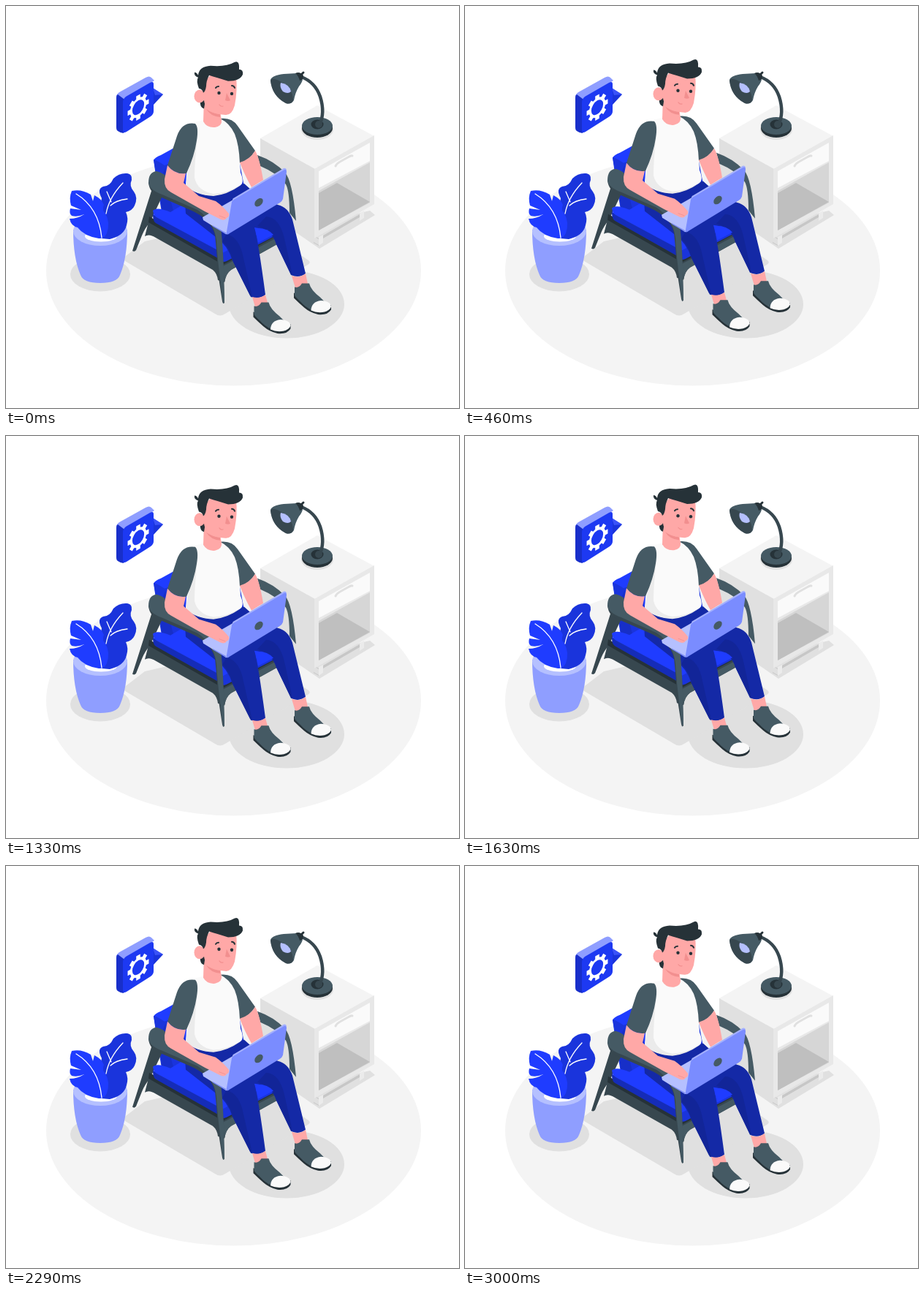
Animation of 620 by 550 pixels, one loop 3040 ms. Source, as an HTML page with a canvas:

```html
<!DOCTYPE html>
<html lang="en">
<head>
<meta charset="utf-8">
<title>Working from the armchair</title>
<style>
html,body{margin:0;width:100%;height:100%;overflow:hidden;background:#fff}
canvas{display:block;width:620px;height:550px}
</style>
</head>
<body>
<canvas id="stage" width="620" height="550"></canvas>
<script>
const ctx = document.getElementById('stage').getContext('2d');
const LOOP = 3040, LIFT = 10.5;
const BLUE = '#1f3cff', BLUE_MID = '#1a34dc', BLUE_DARK = '#152cb8', NAVY = '#1429a6', NAVY_DARK = '#122598';
const LILAC = '#8f9eff', PALE = '#b5c0ff', SKIN = '#ffa8a7', ROSE = '#f28f8f';
const SLATE = '#455a64', STEEL = '#37474f', INK = '#263238';
const SNOW = '#fafafa', MIST = '#f4f4f4', FOG = '#ebebeb', ASH = '#e0e0e0';

function fill(color, d) {
  ctx.fillStyle = color;
  ctx.fill(new Path2D(d));
}
function line(color, width, d) {
  ctx.strokeStyle = color;
  ctx.lineWidth = width;
  ctx.lineCap = ctx.lineJoin = 'round';
  ctx.stroke(new Path2D(d));
}
function oval(color, x, y, rx, ry, turn = 0) {
  ctx.fillStyle = color;
  ctx.beginPath();
  ctx.ellipse(x, y, rx, ry, turn, 0, Math.PI * 2);
  ctx.fill();
}
function at(x, y, draw) {
  ctx.save();
  ctx.translate(x, y);
  draw();
  ctx.restore();
}

function floor() {
  oval(MIST, 311.5, 362, 256.5, 157.5);
  oval(ASH, 129, 367, 41, 23.5);
  oval(ASH, 384, 408, 79, 46.5);
  fill(ASH, 'M163 349Q159 346 164 342L190 322L330 290L414 348Q418 351 413 354L300 421Q293 426 286 421Z');
}

function table() {
  fill(ASH, 'M390 305L429 332L505 286L498 280Z');
  fill('#c7c7c7', 'M421 314L428 318V328L421 324Z M434 314L484 285V289L434 318Z');
  fill(FOG, 'M428 316L434 313V324L428 328Z M484 284L490 280V290L484 294Z');
  fill(MIST, 'M348 181L426 136L504 178L423 223Z');
  fill(ASH, 'M348 181L423 223V316L428 319V327L348 281Z');
  fill('#e8e8e8', 'M422 223L504 177V271L422 318Z');
  fill(SNOW, 'M428 226L498 187V212L428 249Z');
  line(ASH, 3, 'M451 219Q453 215 459 212L468 207Q473 204 474 205');
  fill('#d6d6d6', 'M428 253L498 214V269L428 307Z');
  fill('#bfbfbf', 'M428 256L453 242L498 268L428 307Z');
}

function lamp() {
  oval(ASH, 426, 169, 22, 14);
  oval(INK, 426, 167, 21, 13);
  oval(SLATE, 426, 164, 21, 12);
  oval(INK, 426, 162, 8.5, 6.5);
  line(STEEL, 4.5, 'M429 163Q437 146 430 124Q423 104 404 97');
  oval(STEEL, 428, 162, 5, 5);
  line(INK, 3, 'M402 96L407 91');
  fill(SLATE, 'M362 101Q364 95 380 93L398 92Q406 94 406 99Q406 104 401 110Q396 118 394 129Q390 135 383 133Q364 123 362 101Z');
  fill(INK, 'M396 92Q402 89 407 95Q407 101 402 102Q400 95 396 92Z');
  fill(STEEL, 'M362 102Q364 97 375 103Q393 113 393 129Q391 135 383 133Q364 123 362 102Z');
  fill(PALE, 'M376 105Q388 107 390 117Q386 121 379 117Q374 111 376 105Z');
}

function gear(hole) {
  ctx.save();
  ctx.transform(.866, -.5, 0, 1, 181, 138.7);
  ctx.beginPath();
  for (let i = 0; i < 8; i++) {
    const a = i * Math.PI / 4;
    for (const [r, da] of [[13, -.25], [17, -.19], [17, .19], [13, .25]])
      ctx.lineTo(r * Math.cos(a + da), r * Math.sin(a + da));
  }
  ctx.closePath();
  ctx.fillStyle = '#fff';
  ctx.fill();
  oval(hole, 0, 0, 9.4, 9.4);
  ctx.restore();
}

function bubble() {
  const face = '#1d39f2';
  fill(BLUE_MID, 'M201 113L215 121L202 135Z');
  fill('#3a53f8', 'M201 112L215 121L204 122Z');
  fill(LILAC, 'M151 124Q151 121 155 118L191 98Q196 95 199 98L203 102L160 130Z');
  fill('#182fca', 'M151 125Q151 122 153 121L161 127V174Q157 174 153 171Q151 170 151 166Z');
  fill(face, 'M160 132Q160 127 164 124L197 105Q202 102 202 107V144Q202 148 198 151L165 172Q160 175 160 170Z');
  gear(face);
}

function plant() {
  fill(LILAC, 'M92 306Q92 345 102 368Q106 379 129 379Q152 379 156 368Q166 345 166 306Z');
  oval(PALE, 129, 308, 37, 20);
  oval('#fff', 130, 315, 22, 7.5);
  fill(BLUE_MID, 'M131 318Q124 290 131 263Q124 250 133 247Q142 247 147 236Q155 228 166 229Q173 230 172 238Q168 246 175 254Q181 262 176 273Q173 280 164 282Q168 290 165 300Q162 314 142 319Z');
  fill(BLUE, 'M90 253Q103 250 116 258L119 267L121 259Q131 264 134 272Q131 279 136 284Q143 296 138 311Q134 319 127 318Q107 315 98 303Q89 301 87 291Q98 291 107 285Q98 289 90 287Q86 284 88 277L103 279L89 273Q86 262 90 253Z');
  line('#fff', 1.3, 'M96 257Q127 276 131 317M160 242Q141 262 137 284M138 254L144 268M143 273Q150 266 166 264');
}

function chairBack() {
  fill(SLATE, 'M344 204Q367 212 382 228Q392 239 397 294L388 283Q388 253 383 244Q372 229 348 219Z');
  fill(BLUE, 'M202 211Q204 207 212 204L232 193L300 190L318 205L325 247L250 305L216 290Z');
  fill(BLUE_MID, 'M202 210Q208 212 217 218L238 210L250 262L262 285L242 294L214 288Q206 240 202 210Z');
  fill('#172fc8', 'M210 240L218 222Q222 262 233 292L214 288Z');
  fill(BLUE_MID, 'M318 205L326 247L312 252Z');
  // rear leg and lower rails
  fill(STEEL, 'M200 250L214 260L197 296Q190 304 186 314L178 334Q176 337 173 335Z');
  fill(STEEL, 'M196 292L296 349L371 309V326L308 361Q301 366 299 378L290 375Q289 366 283 361L205 317Q196 311 190 315Z');
  fill(INK, 'M196 288L297 343L371 304V314L297 354L195 296Z');
  fill(SLATE, 'M297 356L371 317V326L308 361Q301 366 299 378Z');
  // seat
  fill(BLUE, 'M201 280Q206 274 225 282L262 260L372 302L297 339L203 288Z');
  fill(BLUE_DARK, 'M201 280Q200 285 206 289L297 338V349L205 297Q200 294 201 280Z');
  fill(BLUE_MID, 'M296 338L371 299V313L302 349Q296 352 296 347Z');
}

function pants() {
  fill(NAVY, 'M244 255L326 243L345 260L372 272Q386 275 392 292Q400 325 410 366Q401 373 390 368L370 326Q364 306 340 303Q345 320 355 395Q346 402 335 398L310 348Q303 327 287 316L246 284Z');
  fill(NAVY_DARK, 'M302 312Q320 317 325 345L337 398L334 396L310 348Q306 330 296 322Z');
  fill(NAVY_DARK, 'M356 288Q374 289 381 318L392 368L390 367L370 326Q366 308 344 301Z');
  fill(BLUE, 'M341 304Q358 303 366 313L345 324Z');
}

function shoe() {
  fill(INK, 'M0 14V21Q6 27 14 34Q22 41 33 43.5Q46 45 51 37V31L24 24Z');
  fill(SLATE, 'M1 6Q7 8 11 1L21 1Q23 10 36 20L46 30Q38 39 25 38Q15 33 9 26Q2 20 1 17Z');
  fill(SNOW, 'M23.5 38Q24 26 37 24.5Q50 25 51 33Q49 38 42 40Q32 42 23.5 38Z');
}

function feet() {
  fill(SKIN, 'M337 398Q347 401 355 395L358 406Q350 414 341 412Z');
  fill(SKIN, 'M391 369Q402 373 410 366L413 380Q405 388 396 386Z');
  at(338.5, 404.5, shoe);
  at(394, 378.5, shoe);
}

function chairArm() {
  fill(STEEL, 'M195 241Q196 257 213 262L252 279Q280 291 286 313Q289 340 290 365L296 404Q297 409 299 406L297 340L285 292Z');
  fill(SLATE, 'M195 242Q195 227 206 226Q217 228 225 240Q239 255 268 266Q290 276 294 300Q297 330 298 360L299 404Q298 408 297 406L292 365Q289 340 288 320Q284 293 262 279L214 258Q197 252 195 242Z');
}

function shirt() {
  fill(SNOW, 'M258 159Q266 157 271 156Q274 165 284 166Q296 165 294 155Q306 155 313 172Q320 195 321 228Q327 242 320 246Q300 258 284 259Q260 259 246 245Q248 200 258 159Z');
  fill(FOG, 'M262 178Q258 215 258 235Q262 253 284 257Q302 256 320 246Q303 258 284 260Q260 259 246 246Q248 225 262 178Z');
  fill(SLATE, 'M259 161Q241 158 234 178L221 218Q231 231 247 229Q258 205 261 184Q264 166 259 161Z');
  fill(SLATE, 'M293 154Q309 152 317 164L341 198Q334 210 320 215Q319 190 313 175Q306 160 293 154Z');
  fill(SKIN, 'M320 214Q334 210 341 198Q347 208 352 238L336 248Q326 230 320 214Z');
}

function laptop() {
  fill(PALE, 'M269 289L311 265L318 267L303 312Q301 313 299 311L270 293Z');
  line('#7484f5', 1.2, 'M283 301L301 311');
  fill(SKIN, 'M221 218Q231 231 246 229L243 242L264 260L287 267Q297 274 305 284Q306 288 302 290Q300 294 294 292L272 281L226 255Q216 250 217 237Z');
  line(ROSE, .8, 'M292 287L300 290');
  fill('#a4b0ff', 'M310 265Q310 263 313 262L380 222Q383 221 384 224L380 230L305 310Z');
  fill('#7a8cff', 'M312 265L381 224Q384 223 384 227L379 264Q378 267 375 269L306 311Q301 315 302 309L309 268Q310 266 312 265Z');
  oval(SLATE, 346, 268.7, 6.8, 4.5, -.8);
}

function hair() {
  fill(INK, 'M263 96Q264 84 280 83Q301 85 313 78Q320 75 319 88Q325 88 324 95Q320 104 304 104Q288 99 278 96Q274 104 274 111Q273 118 270 120Q269 115 264 114Q260 103 263 99Q257 97 258 92Q261 92 263 96Z');
}

function head() {
  fill(SKIN, 'M271 128L270 158Q275 167 286 166Q296 164 295 156L293 144Z');
  fill(ROSE, 'M274 141Q282 147 293 148L293 152Q280 151 274 141Z');
  fill(INK, 'M266 130Q265 139 271 140.5L273 128Z');
  fill(SKIN, 'M275 100L281 93L315 97Q317 115 313 136Q309 150 300 149Q285 148 277 142Q271 138 270 120Z');
  oval(SKIN, 265, 123.5, 7.5, 9);
  at(0, -1.3, hair);
  oval(INK, 291.5, 119, 2.2, 2.3);
  oval(INK, 309, 120, 2.2, 2.3);
  line(INK, 2, 'M287 112Q288 110 291 110M309 109Q312 109 313 112');
  fill(ROSE, 'M302 119L307 129Q304 131 300 129Z');
  line(ROSE, 1.2, 'M292 135Q294 138 297 137');
}

function frame(now) {
  const t = now % LOOP / LOOP;
  const rise = LIFT * (1 - Math.abs(2 * t - 1));
  ctx.fillStyle = '#fff';
  ctx.fillRect(0, 0, 620, 550);
  for (const part of [floor, table, lamp, bubble, plant]) part();
  at(0, -rise, () => {
    for (const part of [chairBack, pants, feet, chairArm, shirt, laptop, head]) part();
  });
}

const start = performance.now();
function tick() {
  frame(performance.now() - start);
  requestAnimationFrame(tick);
}
tick();
</script>
</body>
</html>
```
